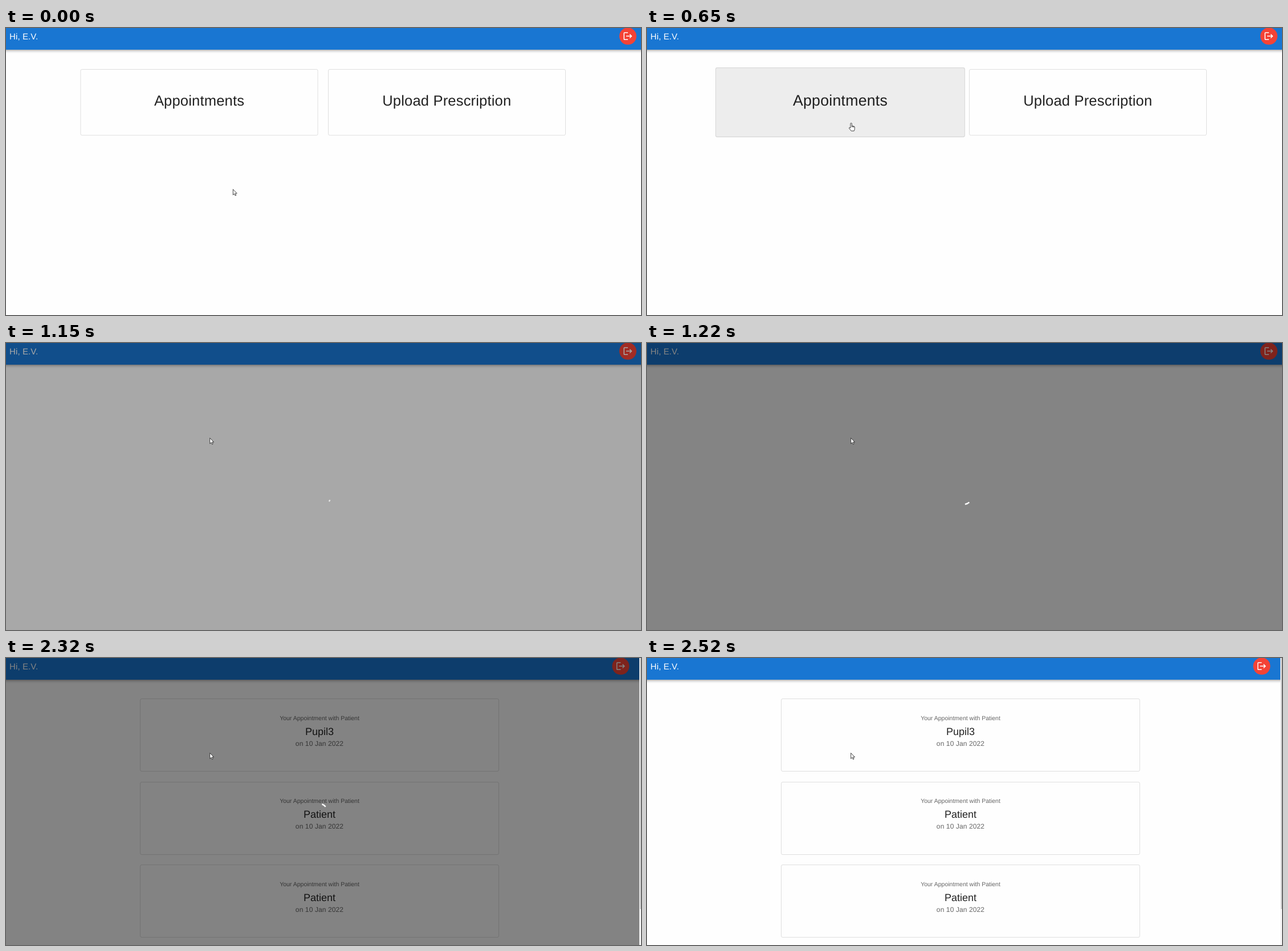
An HTML page with a canvas that plays this animation: 1114 px wide and 503 px high, repeating every 3.03 s.

```html
<!DOCTYPE html>
<html lang="en">
<head>
<meta charset="utf-8">
<title>Appointments</title>
<style>
  html, body { margin: 0; width: 100%; height: 100%; overflow: hidden; background: #fefefe; }
  canvas { display: block; }
</style>
</head>
<body>
<canvas id="stage" width="1114" height="503"></canvas>
<script>
const W = 1114, H = 503, LOOP = 3030, TAU = Math.PI * 2;
const ctx = document.getElementById('stage').getContext('2d');
const FONT = '"Liberation Sans", Arial, sans-serif';
const INK = 'rgba(0,0,0,0.87)', MUTED = 'rgba(0,0,0,0.6)', PAGE = '#fefefe';

// Moments at which the picture is refreshed (ms).
const TICKS = [0, 70, 130, 200, 260, 320, 390, 450, 520, 580, 650,
  930, 1000, 1080, 1150, 1220, 1290, 1350, 1410,
  1490, 1560, 1620, 1690, 1760, 1820, 1890, 1960,
  2030, 2100, 2170, 2240, 2310, 2390, 2460, 2520];

const MOVE_END = 650, HOVER = 380, PRESS = 900, LEAVE = 1052, SPIN = 1055, LOADED = 2289;

const LOGOUT = new Path2D('M17 7l-1.41 1.41L18.17 11H8v2h10.17l-2.58 2.58L17 17l5-5z' +
  'M4 5h8V3H4c-1.1 0-2 .9-2 2v14c0 1.1.9 2 2 2h8v-2H4z');
const ARROW = new Path2D('M.3 .3V10.2L2.6 8.1L4.1 11.5L5.7 10.8L4.2 7.5H7.2Z');
const HAND = new Path2D('M3 9V1.5Q3 .4 4.2 .4Q5.4 .4 5.4 1.5V5.3L9 6.1Q10.3 6.4 10.3 7.6V10.4' +
  'Q10.2 12.6 9.2 14.2H4.3L.8 9.9Q.1 8.6 1.1 8.2Q2.1 7.9 3 9.2Z');
const KNUCKLES = new Path2D('M5.4 5.3V7.6M7.1 5.8V7.8M8.7 6.2V8');

const clamp = v => Math.max(0, Math.min(1, v));
const span = (t, from, length) => clamp((t - from) / length);

function bezier(x1, x2) {
  const curve = (s, a, b) => 3 * (1 - s) * (1 - s) * s * a + 3 * (1 - s) * s * s * b + s * s * s;
  return x => {
    let lo = 0, hi = 1;
    for (let i = 0; i < 24; i++) {
      const mid = (lo + hi) / 2;
      if (curve(mid, x1, x2) < x) lo = mid; else hi = mid;
    }
    return curve(lo, 0, 1);
  };
}
const standard = bezier(0.4, 0.2);
const easeInOut = bezier(0.42, 0.58);

function text(str, x, y, size, color, spacing = 0, align = 'center') {
  ctx.font = `${size}px ${FONT}`;
  ctx.letterSpacing = `${spacing * size}px`;
  ctx.textRendering = 'geometricPrecision';
  ctx.textAlign = align;
  ctx.fillStyle = color;
  ctx.fillText(str, x, y);
}

function box(left, top, right, bottom, fill) {
  ctx.beginPath();
  ctx.roundRect(left, top, right - left, bottom - top, 2.5);
  if (fill) {
    ctx.fillStyle = fill;
    ctx.fill();
  }
  ctx.strokeStyle = 'rgba(0,0,0,0.12)';
  ctx.lineWidth = 1;
  ctx.stroke();
}

function appBar(width, buttonX) {
  const shadows = [[1.5, 3, 0.75, 0.2], [3, 3.75, 0, 0.14], [0.75, 7.5, 0, 0.12]];
  ctx.fillStyle = '#1976d2';
  for (const [dy, blur, inset, alpha] of shadows) {
    ctx.save();
    ctx.shadowColor = `rgba(0,0,0,${alpha})`;
    ctx.shadowOffsetY = dy;
    ctx.shadowBlur = blur;
    ctx.fillRect(-20, -20, width + 40, 58 - inset);
    ctx.restore();
  }
  ctx.fillRect(0, 0, width, 38);
  text('Hi, E.V.', 6, 19.7, 15, '#fff', 0.0075, 'left');

  ctx.fillStyle = '#f44336';
  ctx.beginPath();
  ctx.arc(buttonX, 14.3, 15, 0, TAU);
  ctx.fill();
  ctx.save();
  ctx.translate(buttonX - 9, 5.2);
  ctx.scale(0.75, 0.75);
  ctx.fillStyle = '#fff';
  ctx.fill(LOGOUT);
  ctx.restore();
}

function menu(t) {
  const hover = standard(span(t, HOVER, 150));
  const scale = 1 + 0.05 * hover;
  const shade = 254 - 17 * hover;
  box(565.5, 72.5, 981.5, 188, null);
  text('Upload Prescription', 773.3, 135.6, 25.5, INK, 0.00735);

  ctx.save();
  ctx.translate(339, 130);
  ctx.scale(scale, scale);
  ctx.translate(-339, -130);
  box(130.9, 72.5, 547, 188, `rgb(${shade},${shade},${shade})`);
  if (t >= PRESS) {
    const p = standard(span(t, PRESS, 550));
    ctx.save();
    ctx.clip();
    ctx.fillStyle = `rgba(0,0,0,${0.1 + 0.2 * p})`;
    ctx.beginPath();
    ctx.arc(357, 167, 248 * p, 0, TAU);
    ctx.fill();
    ctx.restore();
  }
  text('Appointments', 339, 135.6, 25.5, INK, 0.00735);
  ctx.restore();
}

function appointments() {
  ['Pupil3', 'Patient', 'Patient'].forEach((name, i) => {
    const y = 145.5 * i, top = Math.floor(71.5 + y) + 0.5;
    box(235.5, top, 864.5, top + 127, null);
    text('Your Appointment with Patient', 550, 108.7 + y, 10.5, MUTED);
    text(name, 550, Math.round(134.8 + y), 18, INK);
    text('on 10 Jan 2022', 550, 153.7 + y, 12, MUTED, 0.00938);
  });
}

function scrollbar() {
  ctx.fillStyle = '#f4f4f4';
  ctx.fillRect(1111, 0, 3, H);
  ctx.fillStyle = '#c1c1c1';
  ctx.fillRect(1112.3, 0, 2, 440);
}

// The arc is measured on a circle of radius 20.2 units, which its tail cannot pass.
function spinner(t, x) {
  const phase = ((t - SPIN) / 1400) % 1;
  const grow = easeInOut(span(phase, 0, 0.5));
  const shrink = easeInOut(span(phase, 0.5, 0.5));
  const start = 15 * grow + 110 * shrink;
  const end = Math.min(start + 1 + 99 * grow, TAU * 20.2);
  ctx.strokeStyle = '#fff';
  ctx.lineWidth = 2.45;
  ctx.beginPath();
  ctx.arc(x, 269, 13.77, phase * TAU + start / 20.2, phase * TAU + end / 20.2);
  ctx.stroke();
}

function backdrop(t, width) {
  const opacity = t < LOADED ? standard(span(t, LEAVE, 225)) : 1 - standard(span(t, LOADED, 195));
  if (opacity <= 0) return;
  ctx.save();
  ctx.globalAlpha = opacity;
  ctx.fillStyle = 'rgba(0,0,0,0.5)';
  ctx.fillRect(0, 0, width, H);
  if (t >= SPIN) spinner(t, t < LOADED ? 556 : 549.7);
  ctx.restore();
}

function cursor(t) {
  const u = 1 - span(t, 0, MOVE_END);
  const p = 1 - u * u;
  const x = 398 - 40.6 * p, y = 282.4 - 116.2 * p;
  const hand = t >= HOVER && t < LEAVE;
  ctx.save();
  ctx.translate(hand ? x - 3.4 : x, y);
  ctx.fillStyle = '#fff';
  ctx.strokeStyle = '#222';
  ctx.lineWidth = 0.85;
  ctx.lineJoin = 'round';
  ctx.fill(hand ? HAND : ARROW);
  ctx.stroke(hand ? HAND : ARROW);
  if (hand) ctx.stroke(KNUCKLES);
  ctx.restore();
}

function draw(t) {
  const loaded = t >= LOADED;
  const width = loaded ? 1111 : W;
  ctx.fillStyle = PAGE;
  ctx.fillRect(0, 0, W, H);
  if (t < LEAVE) menu(t);
  if (loaded) appointments();
  appBar(width, loaded ? 1078.4 : 1091);
  backdrop(t, width);
  if (loaded) scrollbar();
  cursor(t);
}

const began = performance.now();
function tick() {
  const t = (performance.now() - began) % LOOP;
  draw(TICKS.findLast(mark => mark <= t) ?? 0);
  requestAnimationFrame(tick);
}
tick();
</script>
</body>
</html>
```
